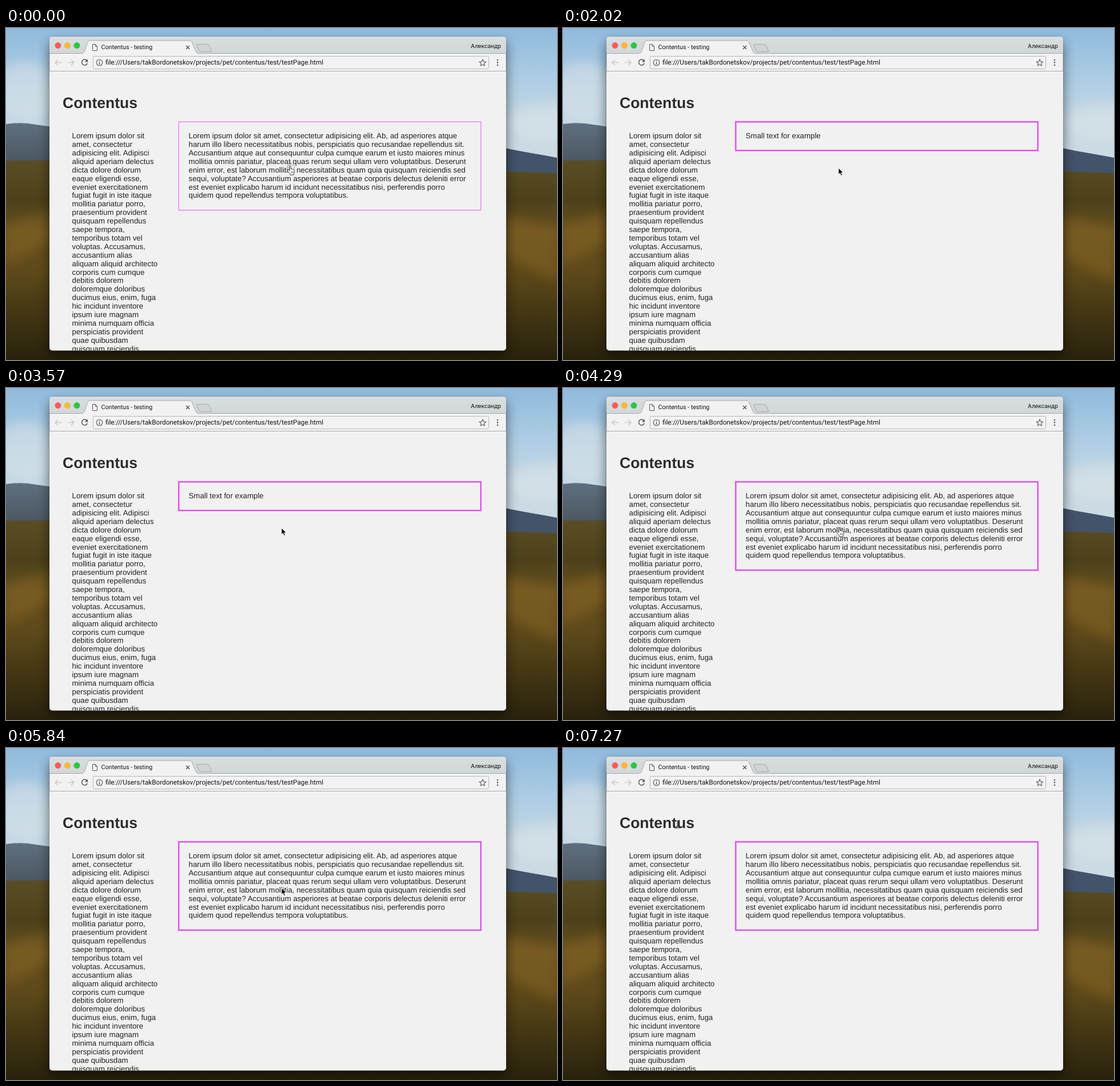
An HTML page for the animation above (8000 ms loop, 964 by 581 pixels).

```html
<!DOCTYPE html>
<html lang="en">
<head>
<meta charset="utf-8">
<title>Contentus - testing</title>
<style>
  html, body { margin: 0; width: 100%; height: 100%; overflow: hidden; background: #2b2510; }
  svg { display: block; width: 964px; height: 581px; }
  text { text-rendering: geometricPrecision; white-space: pre; }
  .page text { font: 13.27px "Liberation Sans", Arial, sans-serif; fill: #222; }
  .page .title { font-size: 26.5px; font-weight: bold; fill: #2c2c2c; }
  .ui { font-family: Roboto, "Noto Sans", sans-serif; fill: #111; }
  .icon { fill: none; stroke: #555; stroke-width: 1.5; }

  .box, .copy, .cursor, #pointer { animation: 8s step-end infinite; }
  .box { fill: none; stroke: #e44ff0; stroke-width: 2.5px; animation-name: box; }
  #long { animation-name: long; }
  #small { animation-name: small; }
  #middle { animation-name: middle; }
  #hand { animation-name: hand; }
  #arrow { animation-name: arrow; }
  #beam { animation-name: beam; }
  #trail { animation-name: trail; }
  #pointer { animation-name: move; }

  @keyframes box {
    0% { height: 154.6px; stroke: #eb92f6; stroke-width: 1.7px; }
    9% { height: 154.6px; stroke: #e97cf4; stroke-width: 1.9px; }
    10.5% { height: 154.6px; stroke: #e665f2; stroke-width: 2.2px; }
    11.875%, 37.25%, 52.125%, 73%, 100% { height: 154.6px; stroke: #e44ff0; stroke-width: 2.5px; }
    25.25%, 44.625%, 58% { height: 50.1px; stroke: #e44ff0; stroke-width: 2.5px; }
  }
  @keyframes long {
    0%, 37.25%, 52.125%, 73%, 100% { visibility: visible; }
    25.25%, 44.625%, 58% { visibility: hidden; }
  }
  @keyframes small {
    0%, 31.25%, 52.125%, 100% { visibility: hidden; }
    25.25%, 44.625% { visibility: visible; }
  }
  @keyframes middle {
    0%, 37.25%, 73%, 100% { visibility: hidden; }
    31.25%, 58% { visibility: visible; }
  }
  @keyframes hand {
    0%, 37.25%, 53.625%, 74.5% { visibility: visible; }
    25.25%, 44.625%, 58%, 83.375%, 100% { visibility: hidden; }
  }
  @keyframes arrow {
    0%, 37.25%, 53.625%, 74.5%, 87.875%, 100% { visibility: hidden; }
    25.25%, 44.625%, 52.125%, 58%, 73%, 83.375% { visibility: visible; }
  }
  @keyframes beam {
    0% { visibility: hidden; }
    87.875%, 100% { visibility: visible; }
  }
  @keyframes trail {
    0% { visibility: visible; }
    1.5%, 100% { visibility: hidden; }
  }
  @keyframes move {
    0% { transform: translate(495.5px, 242px); }
    1.5% { transform: translate(482px, 245px); }
    83.375% { transform: translate(458px, 338px); }
    84.875% { transform: translate(392px, 488px); }
    86.375% { transform: translate(308px, 545px); }
    87.875% { transform: translate(235px, 430px); }
    89.375% { transform: translate(207px, 232px); }
    90.875%, 100% { transform: translate(200px, 134px); }
  }
</style>
</head>
<body>
<svg viewBox="0 0 964 581">
  <defs>
    <linearGradient id="sky" x2="0" y2="1">
      <stop offset="0" stop-color="#8fb9dc"/>
      <stop offset=".25" stop-color="#a5c8e2"/>
      <stop offset=".65" stop-color="#c6d9e5"/>
      <stop offset="1" stop-color="#d0dce2"/>
    </linearGradient>
    <linearGradient id="hill" x2="0" y2="1">
      <stop offset="0" stop-color="#5f6f7f"/>
      <stop offset="1" stop-color="#4a5660"/>
    </linearGradient>
    <linearGradient id="field" x2="0" y2="1">
      <stop offset="0" stop-color="#5a4e26"/>
      <stop offset=".2" stop-color="#4d411b"/>
      <stop offset=".36" stop-color="#68511f"/>
      <stop offset=".56" stop-color="#5e491a"/>
      <stop offset=".78" stop-color="#423513"/>
      <stop offset="1" stop-color="#28220c"/>
    </linearGradient>
    <linearGradient id="strip" x2="0" y2="1">
      <stop offset="0" stop-color="#d9dfe1"/>
      <stop offset="1" stop-color="#d1d6d9"/>
    </linearGradient>
    <filter id="soft" x="-50%" y="-50%" width="200%" height="200%"><feGaussianBlur stdDeviation="9"/></filter>
    <filter id="shade" x="-10%" y="-10%" width="120%" height="120%"><feGaussianBlur stdDeviation="10"/></filter>
    <clipPath id="frame"><rect x="76" y="15" width="799" height="549.400" rx="5"/></clipPath>
    <path id="handShape" d="M4.6 9V2.2Q4.6.5 5.8.5T7 2.2V6Q8.3 5 9.2 6.3Q10.5 5.5 11.3 6.9Q13.1 6.5 13.1 8.6V11Q13 13 11.8 14.2V16H5.6V14.6Q3.8 12.9 2.8 11.2L.8 8.5Q.3 7.2 1.4 6.9T3.2 7.6Z"/>
    <path id="beamShape" d="M-3 -6.5Q0 -6.5 0 -4.5Q0 -6.5 3 -6.5M0 -4.5V4.5M-3 6.5Q0 6.5 0 4.5Q0 6.5 3 6.5M-1.5 2.5H1.5"/>
  </defs>

  <!-- Landscape -->
  <rect width="964" height="260" fill="url(#sky)"/>
  <g filter="url(#soft)" fill="#dde5e8">
    <ellipse cx="35" cy="110" rx="55" ry="50" opacity=".5"/>
    <ellipse cx="945" cy="165" rx="65" ry="35" opacity=".5"/>
  </g>
  <path d="M0 168Q28 164 52 169L110 177V240H0Z" fill="url(#hill)"/>
  <path d="M850 205Q885 213 914 218T964 227V262H850Z" fill="#43536a"/>
  <path d="M0 232L110 231L850 250L964 254V581H0Z" fill="url(#field)"/>
  <g filter="url(#soft)">
    <path d="M0 345L76 322V375L0 415Z" fill="#8f6d2c" opacity=".4"/>
    <path d="M875 330L964 350V445L875 400Z" fill="#8f6d2c" opacity=".4"/>
  </g>

  <!-- Window -->
  <rect x="75" y="25" width="801" height="549" rx="8" opacity=".5" filter="url(#shade)"/>
  <rect x="75.5" y="14.5" width="800" height="550.400" rx="5.5" opacity=".22"/>
  <g clip-path="url(#frame)">
    <rect x="76" y="15" width="799" height="550" fill="#f1f1f1"/>
    <rect x="76" y="15" width="799" height="30" fill="url(#strip)"/>
    <path d="M76 44.5H133Q136 44 137.5 40.5L143 25Q144 22 147 22H321Q324 22 325.5 25L332 41Q333.5 44.5 337 44.5H875V75.5H76Z" fill="#f2f2f2" stroke="#a5a9ab"/>
    <path d="M335 28.5H352.5Q354 28.5 355 30L359.5 40Q360 41.5 358 41.5H341Q339 41.5 338 40L333.5 30Q333 28.5 335 28.5Z" fill="#d0d4d6" stroke="#a5a9ab"/>
    <g stroke-width=".6">
      <circle cx="91" cy="30.6" r="5" fill="#fc5b57" stroke="#e0443e"/>
      <circle cx="107.4" cy="30.6" r="5" fill="#fdbc2f" stroke="#dea123"/>
      <circle cx="124" cy="30.6" r="5" fill="#29c941" stroke="#1aab29"/>
    </g>
    <path class="icon" style="stroke-width:1" d="M151.5 28.5H156L159.5 32V39.5H151.5ZM156 28.5V32H159.5"/>
    <path class="icon" d="M315 31L321 37M321 31L315 37"/>
    <g class="ui">
      <text x="166.5" y="37.4" font-size="10.7">Contentus - testing</text>
      <text x="866" y="34.6" font-size="10.3" text-anchor="end">Александр</text>
    </g>
    <g class="icon">
      <path stroke="#cacaca" d="M97 60.5H86M91 55.5L86 60.5L91 65.5M108 60.5H119M114 55.5L119 60.5L114 65.5"/>
      <path d="M141.5 57A5 5 0 1 0 142.3 61.8"/>
      <path d="M143 54.5V59.5H138Z" fill="#555" stroke="none"/>
    </g>
    <rect x="152.5" y="49.5" width="692" height="22" rx="2" fill="#f3f3f3" stroke="#b7b7b7"/>
    <circle class="icon" style="stroke-width:1.1" cx="163.5" cy="60.5" r="5.3"/>
    <path d="M163.5 57V58.3M163.5 59.5V63.7" stroke="#444" stroke-width="1.3"/>
    <text class="ui" x="174" y="64.4" font-size="11.72">file:///Users/takBordonetskov/projects/pet/contentus/test/testPage.html</text>
    <path class="icon" style="stroke-width:1.1" d="M834 55L835.6 58.8L839.7 59.2L836.6 61.9L837.5 65.9L834 63.8L830.5 65.9L831.4 61.9L828.3 59.2L832.4 58.8Z"/>
    <g fill="#555"><circle cx="860" cy="56" r="1.3"/><circle cx="860" cy="60.5" r="1.3"/><circle cx="860" cy="65" r="1.3"/></g>

    <g class="page">
      <text class="title" x="99" y="140.4">Contentus</text>
      <text id="side"></text>
      <rect class="box" x="302.2" y="164.2" width="528.6" height="154.6"/>
      <text id="long" class="copy"></text>
      <text id="small" class="copy" x="319.5" y="193.1">Small text for example</text>
      <text id="middle" class="copy" x="319.5" y="193.1">Middle text in one line or two line for example</text>
    </g>
  </g>

  <g id="pointer">
    <g transform="translate(-4 -1)" stroke="#222" stroke-width=".9" stroke-linejoin="round">
      <use id="trail" class="cursor" href="#handShape" y="-8" fill="none" opacity=".5"/>
      <g id="hand" class="cursor">
        <use href="#handShape" fill="#fff"/>
        <path d="M7.3 10V13M9 10V13M10.7 10V13" stroke-width=".6"/>
      </g>
    </g>
    <path id="arrow" class="cursor" d="M0 0V11.3L2.6 8.9L4.5 13.3L6.5 12.4L4.7 8.2H8.2Z" fill="#050505" stroke="#fff" stroke-width=".8"/>
    <g id="beam" class="cursor" fill="none">
      <use href="#beamShape" stroke="#fff" stroke-width="2" opacity=".6"/>
      <use href="#beamShape" stroke="#222"/>
    </g>
  </g>
</svg>
<script>
  const LEADING = 14.9;

  function setLines(id, x, copy) {
    const text = document.getElementById(id);
    copy.trim().split("\n").forEach((line, i) => {
      const span = document.createElementNS("http://www.w3.org/2000/svg", "tspan");
      span.setAttribute("x", x);
      span.setAttribute("y", 193.1 + i * LEADING);
      span.textContent = line.trim();
      text.append(span);
    });
  }

  setLines("side", 115.5, `
    Lorem ipsum dolor sit
    amet, consectetur
    adipisicing elit. Adipisci
    aliquid aperiam delectus
    dicta dolore dolorum
    eaque eligendi esse,
    eveniet exercitationem
    fugiat fugit in iste itaque
    mollitia pariatur porro,
    praesentium provident
    quisquam repellendus
    saepe tempora,
    temporibus totam vel
    voluptas. Accusamus,
    accusantium alias
    aliquam aliquid architecto
    corporis cum cumque
    debitis dolorem
    doloremque doloribus
    ducimus eius, enim, fuga
    hic incidunt inventore
    ipsum iure magnam
    minima numquam officia
    perspiciatis provident
    quae quibusdam
    quisquam reiciendis`);

  setLines("long", 319.5, `
    Lorem ipsum dolor sit amet, consectetur adipisicing elit. Ab, ad asperiores atque
    harum illo libero necessitatibus nobis, perspiciatis quo recusandae repellendus sit.
    Accusantium atque aut consequuntur culpa cumque earum et iusto maiores minus
    mollitia omnis pariatur, placeat quas rerum sequi ullam vero voluptatibus. Deserunt
    enim error, est laborum mollitia, necessitatibus quam quia quisquam reiciendis sed
    sequi, voluptate? Accusantium asperiores at beatae corporis delectus deleniti error
    est eveniet explicabo harum id incidunt necessitatibus nisi, perferendis porro
    quidem quod repellendus tempora voluptatibus.`);
</script>
</body>
</html>
```
